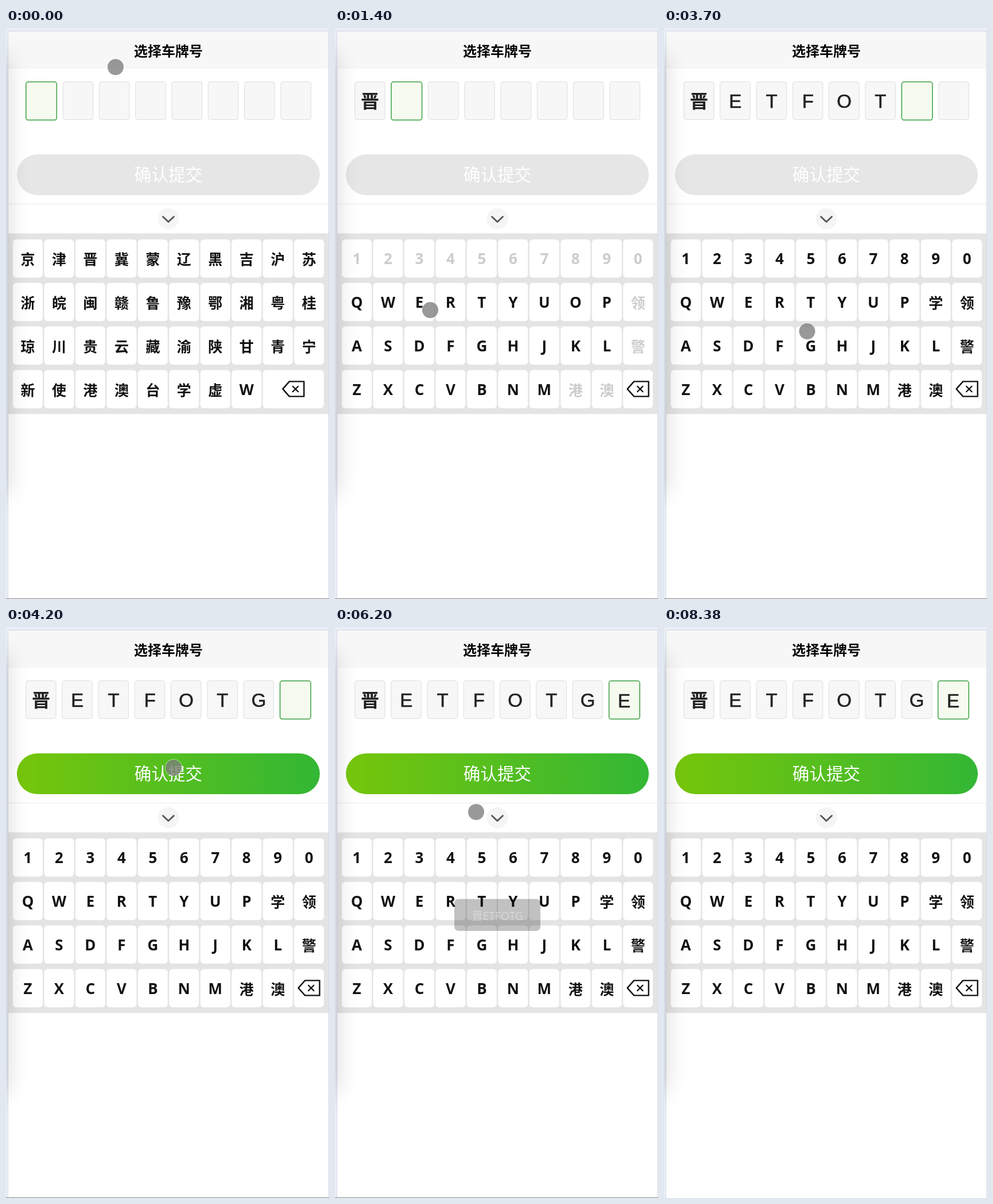
These frames come from a looping animation (563 by 994 pixels, 8.57 s). An HTML page with a canvas:

```html
<!DOCTYPE html>
<html lang="zh-CN">
<head>
<meta charset="utf-8">
<title>选择车牌号</title>
<style>
html, body { margin: 0; width: 100%; height: 100%; overflow: hidden; background: #fff; }
canvas { display: block; width: 100%; height: 100%; }
</style>
</head>
<body>
<canvas id="stage"></canvas>
<script>
const W = 563, H = 994, LOOP = 8570, STEP = 100, LAST = 8380;
const UI = '"Noto Sans", "Noto Sans CJK SC", "Noto Sans CJK", sans-serif';
const CJK = '"Noto Sans CJK SC", "Noto Sans CJK", sans-serif';
const ARIAL = '"Liberation Sans", Arial, sans-serif';

const canvas = document.getElementById('stage');
const ctx = canvas.getContext('2d');
const scale = window.devicePixelRatio || 1;
canvas.width = Math.round(W * scale);
canvas.height = Math.round(H * scale);

const PLATE = [...'晋ETFOTGE'];
const TYPED_AT = [900, 1700, 2100, 2500, 3100, 3600, 3900, 5400];
const PROVINCES = ['京津晋冀蒙辽黑吉沪苏', '浙皖闽赣鲁豫鄂湘粤桂', '琼川贵云藏渝陕甘青宁', '新使港澳台学虚W'];
const LETTERS = ['1234567890', 'QWERTYUOP领', 'ASDFGHJKL警', 'ZXCVBNM港澳'];
const LAST_KEYS = ['1234567890', 'QWERTYUP学领', 'ASDFGHJKL警', 'ZXCVBNM港澳'];

// Pointer stops: arrival step, x, y, steps of rest
const POINTER = [
  [0, 191, 68], [2, 222, 310], [4, 115, 606], [5, 39, 545], [7, 139, 423, 2],
  [10, 148, 415, 2], [14, 166, 491, 5], [21, 246, 486], [22, 205, 534, 3],
  [27, 280, 600], [29, 465, 550], [31, 425, 489, 1], [35, 262, 492],
  [37, 249.5, 528, 2], [42, 292, 245, 1], [45, 299, 255, 3], [50, 268, 338],
  [53, 166, 490, 2], [58, 139, 475], [62, 246, 322], [65, 286, 265, 3], [70, 34, 191]
];

const TOASTS = [
  { start: 4700, end: 6300, text: '晋ETFOTG', width: 150 },
  { start: 6700, end: LAST, text: '晋ETFOTGE', width: 160 }
];

const isCjk = c => c.charCodeAt(0) > 255;

function box(x, y, w, h, r, fill, stroke, line = 1) {
  ctx.beginPath();
  ctx.roundRect(x, y, w, h, r);
  ctx.fillStyle = fill;
  ctx.fill();
  if (stroke) {
    ctx.strokeStyle = stroke;
    ctx.lineWidth = line;
    ctx.stroke();
  }
}

function rect(x, y, w, h, fill) {
  ctx.fillStyle = fill;
  ctx.fillRect(x, y, w, h);
}

function disc(x, y, r, fill) {
  ctx.beginPath();
  ctx.arc(x, y, r, 0, Math.PI * 2);
  ctx.fillStyle = fill;
  ctx.fill();
}

function label(text, x, y, font, fill) {
  ctx.font = font;
  ctx.fillStyle = fill;
  ctx.fillText(text, x, y);
}

function trace(path, x, y, color, width) {
  ctx.save();
  ctx.translate(x, y);
  ctx.strokeStyle = color;
  ctx.lineWidth = width;
  ctx.stroke(new Path2D(path));
  ctx.restore();
}

function drawPage() {
  rect(0, 0, W, H, '#e9eef7');
  rect(3, 5, W, H, '#d5d9e3');
  rect(4, 6, 558, H, '#fff');
  rect(4, 6, 558, 65, '#f7f7f7');
  label('选择车牌号', 283, 49, `700 24px ${CJK}`, '#060606');
}

function drawPlate(count) {
  const active = Math.min(count, 7);
  for (let i = 0; i < 8; i++) {
    const on = i === active;
    const x = 34 + i * 63.27 + (i > active ? 1.5 : 0);
    if (on) box(x + .75, 93.75, 53.6, 66.6, 4, '#f5fbef', '#3aa043', 1.5);
    else box(x + .5, 93.5, 52.6, 66, 4, '#f7f7f7', '#dedede');
    if (i >= count) continue;
    const c = PLATE[i], cx = x + 27, y = on ? 139.5 : 138.5;
    if (isCjk(c)) {
      label(c, cx, y + .5, `700 32px ${CJK}`, '#222');
    } else {
      label(c, cx, y, `400 33px ${ARIAL}`, '#222');
      ctx.strokeStyle = '#222';
      ctx.lineWidth = .6;
      ctx.strokeText(c, cx, y);
    }
  }
}

function drawButton(enabled) {
  let fill = '#e6e6e6';
  if (enabled) {
    fill = ctx.createLinearGradient(19, 0, 547, 0);
    fill.addColorStop(0, '#76c60a');
    fill.addColorStop(1, '#33b735');
  }
  box(19, 220, 528, 71, 35.5, fill);
  label('确认提交', 283, 266, `400 29.6px ${CJK}`, '#fff');
}

function drawCollapse() {
  rect(4, 306, 558, 1, '#ebebeb');
  disc(283, 332, 18.5, '#f5f5f5');
  trace('M-9.5-4.5L0 4.5L9.5-4.5', 283, 333, '#555', 2.8);
}

function drawBackspace(x, y) {
  trace('M-18.5 0L-7-13H18.5V13H-7Z', x, y, '#111', 2.4);
  trace('M-1-4.7L8.4 4.7M8.4-4.7L-1 4.7', x, y, '#111', 2.2);
}

function drawKeyboard(count) {
  const rows = count === 0 ? PROVINCES : count < 6 ? LETTERS : LAST_KEYS;
  const pitch = 54.47, keyW = 52, keyH = 66.5;
  rect(4, 357.5, 558, 314.5, '#e4e4e4');
  rows.forEach((row, r) => {
    const y = 368 + r * 75.8;
    [...row].forEach((c, i) => {
      const x = 12 + i * pitch, wide = isCjk(c);
      const off = count === 1 && r === 0 || count > 0 && count < 6 && wide;
      box(x, y, keyW, keyH, 6, '#fff');
      const font = wide ? `700 25px ${CJK}` : `700 26px ${UI}`;
      label(c, x + keyW / 2, y + (wide ? 44.3 : 43.2), font, off ? '#ccc' : '#111');
    });
    if (r === 3) {
      const x = 12 + row.length * pitch;
      box(x, y, 554 - x, keyH, 6, '#fff');
      drawBackspace((x + 554) / 2, y + 33);
    }
  });
}

function drawEdgeShadow() {
  ctx.save();
  ctx.shadowColor = 'rgba(20, 12, 30, .19)';
  ctx.shadowBlur = 40 * scale;
  rect(-120, 50, 120, 760, '#000');
  ctx.restore();
}

function drawToast(t) {
  for (const { start, end, text, width } of TOASTS) {
    if (t < start || t >= end) continue;
    ctx.globalAlpha = t >= start + 1500 ? .37 : t < start + STEP ? .5 : 1;
    box(283 - width / 2, 473.5, width, 55.5, 7, 'rgba(0, 0, 0, .66)');
    label(text, 283, 509.5, `400 19.3px ${UI}`, '#fff');
    ctx.globalAlpha = 1;
  }
}

function drawPointer(step) {
  const next = POINTER.findIndex(p => p[0] >= step);
  if (next < 0) return;
  const [t1, x1, y1] = POINTER[next];
  const [t0, x0, y0, rest = 0] = POINTER[Math.max(next - 1, 0)];
  const leave = t0 + rest;
  const k = t1 > leave ? Math.max(0, (step - leave) / (t1 - leave)) : 1;
  const x = x0 + (x1 - x0) * k, y = y0 + (y1 - y0) * k;
  disc(x, y, 15.2, 'rgba(255, 255, 255, .4)');
  disc(x, y, 14, 'rgba(96, 96, 96, .64)');
}

function draw(now) {
  const time = now % LOOP;
  const t = time >= LAST ? LAST : Math.floor(time / STEP) * STEP;
  const count = TYPED_AT.filter(at => at <= t).length;
  ctx.setTransform(scale, 0, 0, scale, 0, 0);
  ctx.textAlign = 'center';
  ctx.lineCap = ctx.lineJoin = 'round';
  drawPage();
  drawPlate(count);
  drawButton(count >= 7);
  drawCollapse();
  drawKeyboard(count);
  drawEdgeShadow();
  drawToast(t);
  drawPointer(t / STEP);
  if (t < LAST) rect(0, H - 1, W, 1, '#858585');
}

let origin;
function tick(now) {
  origin ??= now;
  draw(now - origin);
  requestAnimationFrame(tick);
}
draw(0);
requestAnimationFrame(tick);
</script>
</body>
</html>
```
